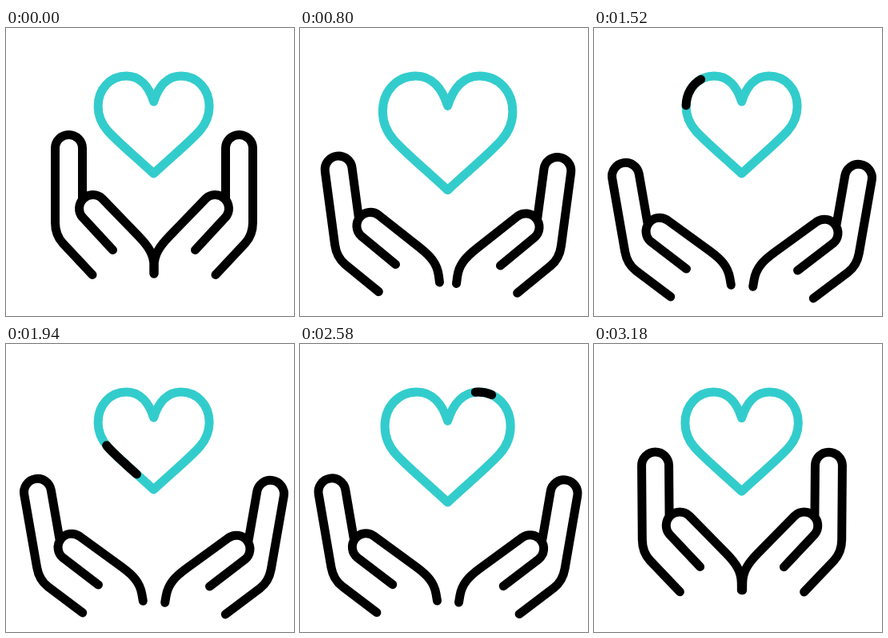
Recreate the animation shown at these times as an HTML page. Size 360 px wide and 360 px high, loop 3200 ms.

```html
<!DOCTYPE html>
<html lang="en">
<head>
<meta charset="utf-8">
<title>Caring hands</title>
<style>
  html, body { margin: 0; width: 100%; height: 100%; overflow: hidden; background: #fff; }
  svg { display: block; width: 100vw; height: 100vh; }
</style>
</head>
<body>
<svg viewBox="0 0 360 360" fill="none" stroke="#000" stroke-width="11" stroke-linecap="round" stroke-linejoin="round">
  <defs>
    <g id="hand">
      <path d="M108 308.5L71 269C64.5 262 61.5 253 61.5 243V150.5a17 17 0 0 1 34 0V212"/>
      <path d="M133.5 277.5L95.6 236.6A17 17 0 0 1 120.4 213.4L166 260.5C178 273 185 283 185 298V307"/>
    </g>
    <path id="outline" pathLength="1" d="M185 92C179 73 168 60 151 60C131 60 115.5 76 115.5 98C115.5 110 120 120 127.5 128.5C139 141.5 159 158 185 182C211 158 231 141.5 242.5 128.5C250 120 254.5 110 254.5 98C254.5 76 239 60 219 60C202 60 191 73 185 92Z"/>
  </defs>
  <g id="heart">
    <use href="#outline" stroke="#3cc"/>
    <use href="#outline" id="runner"/>
  </g>
  <g id="left"><use href="#hand"/></g>
  <g transform="matrix(-1 0 0 1 370 0)"><g id="right"><use href="#hand"/></g></g>
</svg>
<script>
const LOOP = 3200;
const get = id => document.getElementById(id);
const heart = get('heart'), runner = get('runner');

const ease = (t, from, to) => {
  const p = Math.min(1, Math.max(0, (t - from) / (to - from)));
  return p * p * (3 - 2 * p);
};
const pulse = (t, from, peak, to) => ease(t, from, peak) - ease(t, peak, to);

// Smooth curve through [time, value] points, flat at both ends.
function curve(points) {
  const last = points.length - 1;
  const slope = i => i === 0 || i === last ? 0 :
    (points[i + 1][1] - points[i - 1][1]) / (points[i + 1][0] - points[i - 1][0]);
  return t => {
    if (t <= points[0][0]) return points[0][1];
    if (t >= points[last][0]) return points[last][1];
    const i = points.findIndex(p => p[0] > t) - 1;
    const [t0, a] = points[i], [t1, b] = points[i + 1];
    const d = t1 - t0, p = (t - t0) / d, q = 1 - p;
    return q * q * (1 + 2 * p) * a + p * p * (1 + 2 * q) * b
      + p * q * d * (q * slope(i) - p * slope(i + 1));
  };
}
const head = curve([[850, 0], [1140, .096], [1940, .435], [2580, .893], [2880, 1]]);
const tail = curve([[950, 0], [1140, .05], [1940, .316], [2580, .851], [2920, 1]]);

function moveHand(id, open, drop) {
  get(id).setAttribute('transform',
    `translate(${-13.5 * open} ${drop * open}) rotate(${-9.9 * open} 185 308)`);
}

function draw(t) {
  const open = ease(t, 195, 1075) - ease(t, 2530, 3280);
  moveHand('left', open, 14.2);
  moveHand('right', open, 16.2);

  const scale = 1 + .172 * (pulse(t, 230, 850, 1420) + pulse(t, 2160, 2780, 3280));
  heart.setAttribute('transform', `translate(184.6 60) scale(${scale}) translate(-185 -60)`);
  heart.setAttribute('stroke-width', 11 / scale);

  const start = tail(t), length = head(t) - start;
  runner.style.display = length > .002 ? '' : 'none';
  runner.setAttribute('stroke-dasharray', `${Math.max(length, 0)} 2`);
  runner.setAttribute('stroke-dashoffset', -start);
}

const begin = performance.now();
function tick() {
  draw((performance.now() - begin) % LOOP);
  requestAnimationFrame(tick);
}
tick();
</script>
</body>
</html>
```
